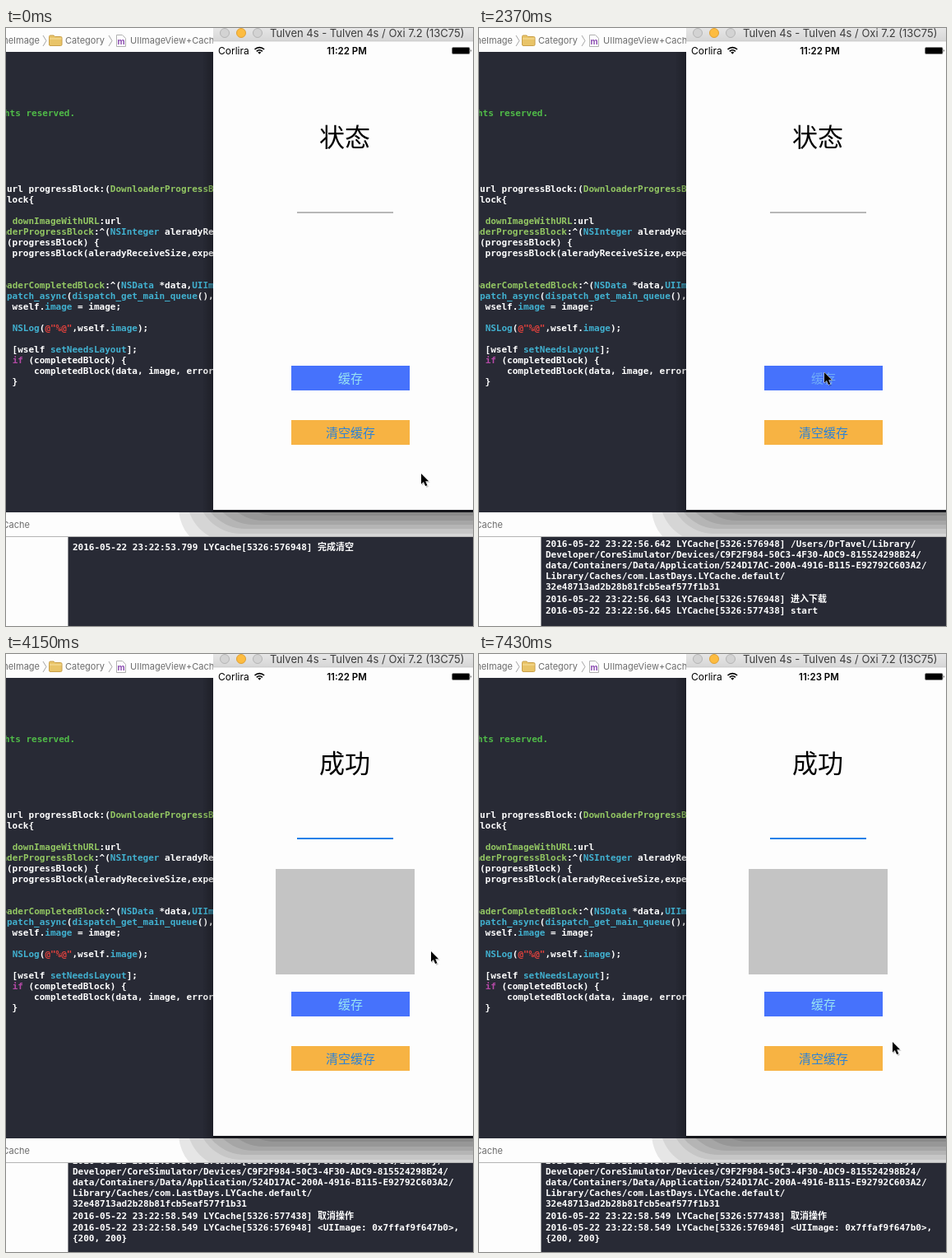
An HTML page for the animation above (8000 ms loop, 568x726 px).

```html
<!DOCTYPE html>
<html lang="en">
<head>
<meta charset="utf-8">
<title>Image cache demo</title>
<style>
html, body { margin: 0; width: 100%; height: 100%; overflow: hidden; background: #fdfdfd; }
svg { display: block; }
text { white-space: pre; }
.ui { font-family: Inter, Roboto, sans-serif; }
.cjk { font-family: "Noto Sans CJK SC", "Noto Sans CJK", sans-serif; text-anchor: middle; }
.mono { font: bold 11px "DejaVu Sans Mono", "Noto Sans CJK SC", monospace; fill: #fff; }
.fn { fill: #93c763; }
.ty { fill: #41b1d0; }
.str { fill: #e5423d; }
.kw { fill: #b449a6; }
.rem { fill: #50bb48; }
.crumb { font-size: 11px; fill: #6c6c6c; }
</style>
</head>
<body>
<svg width="568" height="726" viewBox="0 0 568 726">
  <defs>
    <linearGradient id="dim">
      <stop offset="0" stop-color="#000" stop-opacity="0"/>
      <stop offset="1" stop-color="#000" stop-opacity=".25"/>
    </linearGradient>
    <linearGradient id="bar" x2="0" y2="1">
      <stop offset="0" stop-color="#e6e6e6"/>
      <stop offset="1" stop-color="#d6d6d6"/>
    </linearGradient>
    <clipPath id="strip"><rect y="588" width="568" height="29"/></clipPath>
    <clipPath id="console"><rect x="76" y="618" width="492" height="108"/></clipPath>
  </defs>

  <!-- editor -->
  <rect width="568" height="726" fill="#fdfdfd"/>
  <rect y="29" width="568" height="559" fill="#282a35"/>
  <g class="ui crumb">
    <text x="41" y="19" text-anchor="end">neImage</text>
    <text x="72" y="19">Category</text>
    <text x="151" y="19">UIImageView+Cache.m</text>
    <text x="29" y="607" text-anchor="end">LYCache</text>
  </g>
  <path d="M45 9l4 6.500-4 6.500M125 9l4 6.500-4 6.500" fill="none" stroke="#a5a5a5"/>
  <path d="M52.500 10.500q0-1.500 1.500-1.500h4l1.500 1.500h7q1.500 0 1.500 1.500v8q0 1.500-1.500 1.500h-12.500q-1.500 0-1.500-1.500z" fill="#e9c468" stroke="#c9a04a"/>
  <path d="M53 13h14.500" stroke="#f7e0a0"/>
  <path d="M134.500 8.500h7l4 4v10h-11z" fill="#fff" stroke="#b0b0b0"/>
  <text class="ui" x="140" y="20" font-size="10" font-weight="700" fill="#8a4bb0" text-anchor="middle">m</text>
  <g id="code"></g>
  <rect x="238" y="29" width="14" height="559" fill="url(#dim)"/>

  <!-- lower pane -->
  <g id="shade" clip-path="url(#strip)"></g>
  <path d="M0 617.500h568" stroke="#b4b4b4"/>
  <rect x="75.500" y="618" width="493" height="108" fill="#282a35"/>
  <g id="log" clip-path="url(#console)"></g>

  <!-- simulator -->
  <rect x="252" y="584" width="316" height="4" fill="#15161b"/>
  <rect x="252" width="316" height="585" fill="#fdfdfd"/>
  <rect x="252" width="316" height="16" fill="url(#bar)"/>
  <path d="M252 16h316" stroke="#bdbdbd" stroke-width=".6"/>
  <g fill="#d3d3d3" stroke="#b5b5b5">
    <circle cx="266" cy="6" r="5.500"/>
    <circle cx="286" cy="6" r="5.500" fill="#fdbc40" stroke="#e0a033"/>
    <circle cx="306" cy="6" r="5.500"/>
  </g>
  <g class="ui">
    <text x="321" y="11" font-size="13" fill="#3c3c3c">Tulven 4s - Tulven 4s / Oxi 7.2 (13C75)</text>
    <text x="258" y="31.500" font-size="12">Corlira</text>
    <text id="clock" y="31.500" font-size="11.500" font-weight="600" text-anchor="middle"></text>
  </g>
  <path d="M302.500 26a8.200 8.200 0 0 1 11.600 0M304.800 28.300a5 5 0 0 1 7 0" fill="none" stroke="#000" stroke-width="1.700"/>
  <path d="M308.300 31.800l-2-2.200a3 3 0 0 1 4 0z"/>
  <rect x="542.500" y="23.500" width="21.500" height="8" rx="1.500" fill="#000" stroke="#888" stroke-width=".8"/>
  <path d="M565 26q1.500 1.500 0 3z"/>

  <text id="state" class="cjk" x="412" y="144" font-size="31"></text>
  <rect x="354" y="223" width="117" height="2" fill="#b7b7b7"/>
  <rect id="progress" x="354" y="223" height="2" fill="#1a80e8"/>
  <rect id="photo" x="328" y="261" width="169" height="128" fill="#c4c4c4"/>
  <rect x="347" y="410" width="144" height="30" fill="#4672fc"/>
  <rect x="347" y="476" width="144" height="30" fill="#f7b343"/>
  <g class="cjk" font-size="15">
    <text id="cache" x="419" y="430.500" fill="#97e2f3">缓存</text>
    <text x="419" y="496.500" fill="#2c82d6">清空缓存</text>
  </g>

  <g id="pointer">
    <g transform="scale(.9)">
      <path d="M1 1.500v14.500l3.500-3 2.500 6 3-1.200-2.500-5.800h4.500z" opacity=".2"/>
      <path d="M0 0v14.200l3.200-3 2.400 5.600 2.600-1.100-2.400-5.500h4.400z" stroke="#fff" stroke-width="1.100" paint-order="stroke"/>
    </g>
  </g>
</svg>
<script>
const $ = id => document.getElementById(id);
const LOOP = 8000, STEP = 148.6;

// Row number (13 px apart), markup with {class|text}, left edge
const code = [
  [0, "{rem|hts reserved.}", -2],
  [7, "url progressBlock:({fn|DownloaderProgressBlock}"],
  [8, "lock{"],
  [10, " {fn|downImageWithURL}:url"],
  [11, "{fn|aderProgressBlock}:^({ty|NSInteger} aleradyReceive", -5.6],
  [12, "(progressBlock) {"],
  [13, " progressBlock(aleradyReceiveSize,expected"],
  [16, "{fn|oaderCompletedBlock}:^({ty|NSData} *data,{ty|UIImage}", -5.6],
  [17, "{ty|patch_async}({ty|dispatch_get_main_queue}(),"],
  [18, " wself.{ty|image} = image;"],
  [20, " {ty|NSLog}({str|@\"%@\"},wself.{ty|image});"],
  [22, " [wself {ty|setNeedsLayout}];"],
  [23, " {kw|if} (completedBlock) {"],
  [24, "     completedBlock(data, image, error"],
  [25, " }"]
];
$("code").innerHTML = code.map(([row, s, x = 1]) =>
  `<text class="mono" x="${x}" y="${107 + row * 13 + (row ? 1 : 0)}">` +
  s.replace(/\{(\w+)\|([^}]+)\}/g, '<tspan class="$1">$2</tspan>') + "</text>").join("");

// Banded window shadow: left edge, bottom edge, grey level
$("shade").innerHTML = [
  [210, 636, 230], [220, 624, 213], [232, 614, 198], [237, 608, 181],
  [247, 603, 166], [259, 598, 151], [273, 592, 138]
].map(([x, y, g]) =>
  `<rect x="${x}" y="480" width="500" height="${y - 480}" rx="54" fill="rgb(${g},${g},${g})"/>`).join("");

const stamp = (time, id, s) => `2016-05-22 23:22:${time} LYCache[5326:${id}] ${s}`;
const pathLog = (time, id) => [
  stamp(time, id, "/Users/DrTavel/Library/"),
  "Developer/CoreSimulator/Devices/C9F2F984-50C3-4F30-ADC9-815524298B24/",
  "data/Containers/Data/Application/524D17AC-200A-4916-B115-E92792C603A2/",
  "Library/Caches/com.LastDays.LYCache.default/",
  "32e48713ad2b28b81fcb5eaf577f1b31"
];
const download = [
  ...pathLog("56.642", 576948),
  stamp("56.643", 576948, "进入下载"),
  stamp("56.645", 577438, "start")
];
// Start time, first baseline, lines
const logs = [
  [0, 634, [stamp("53.799", 576948, "完成清空")]],
  [2370, 630, download],
  [3560, 614, [...download, stamp("57.907", 577438, "开始")]],
  [4150, 619, [
    ...pathLog("58.549", 577438),
    stamp("58.549", 577438, "取消操作"),
    stamp("58.549", 576948, "<UIImage: 0x7ffaf9f647b0>,"),
    "{200, 200}"
  ]]
];
const make = (tag, parent) =>
  parent.appendChild(document.createElementNS("http://www.w3.org/2000/svg", tag));
const logGroups = logs.map(([, top, lines]) => {
  const group = make("g", $("log"));
  let y = top;
  lines.forEach((line, i) => {
    const tall = /[一-龥]/.test(line);   // Chinese lines take 3 px more
    if (i && tall) y += 2;
    const text = make("text", group);
    text.setAttribute("class", "mono");
    text.setAttribute("x", 81);
    text.setAttribute("y", y);
    text.textContent = line;
    y += tall ? 14 : 13;
  });
  return group;
});

// Pointer path: step, x, y
const path = [
  [0, 505, 541], [3, 523, 528], [4, 525, 526], [7, 510, 563], [8, 508, 565],
  [14, 422, 408], [15, 420, 418], [16, 420, 418], [18, 530, 382], [20, 517, 361],
  [37, 517, 361], [38, 527, 382], [45, 440, 434], [46, 431, 426], [50, 503, 471]
];
function pointerAt(k) {
  const i = path.findIndex(p => p[0] > k);
  if (i < 0) return path[path.length - 1].slice(1);
  const [a, x, y] = path[i - 1], [b, u, v] = path[i], f = (k - a) / (b - a);
  return [x + (u - x) * f, y + (v - y) * f];
}

function draw(t) {
  const done = t >= 4150, late = t >= 5650;
  const [x, y] = pointerAt(Math.floor((t + 14) / STEP));
  $("pointer").setAttribute("transform", `translate(${x.toFixed(1)} ${y.toFixed(1)})`);
  $("clock").textContent = late ? "11:23 PM" : "11:22 PM";
  $("clock").setAttribute("x", late ? 413.5 : 414.5);
  $("state").textContent = done ? "成功" : "状态";
  $("progress").setAttribute("width", done ? 117 : t >= 3560 ? 61 : 0);
  $("photo").setAttribute("visibility", done ? "visible" : "hidden");
  $("cache").setAttribute("opacity", t < 2220 || t >= 2520 ? 1 : t < 2370 ? 0.2 : 0.5);
  const current = logs.filter(l => l[0] <= t).length - 1;
  logGroups.forEach((g, i) => g.setAttribute("visibility", i === current ? "visible" : "hidden"));
}

const start = performance.now();
function tick(now) {
  draw(Math.max(0, now - start) % LOOP);
  requestAnimationFrame(tick);
}
draw(0);
requestAnimationFrame(tick);
</script>
</body>
</html>
```
